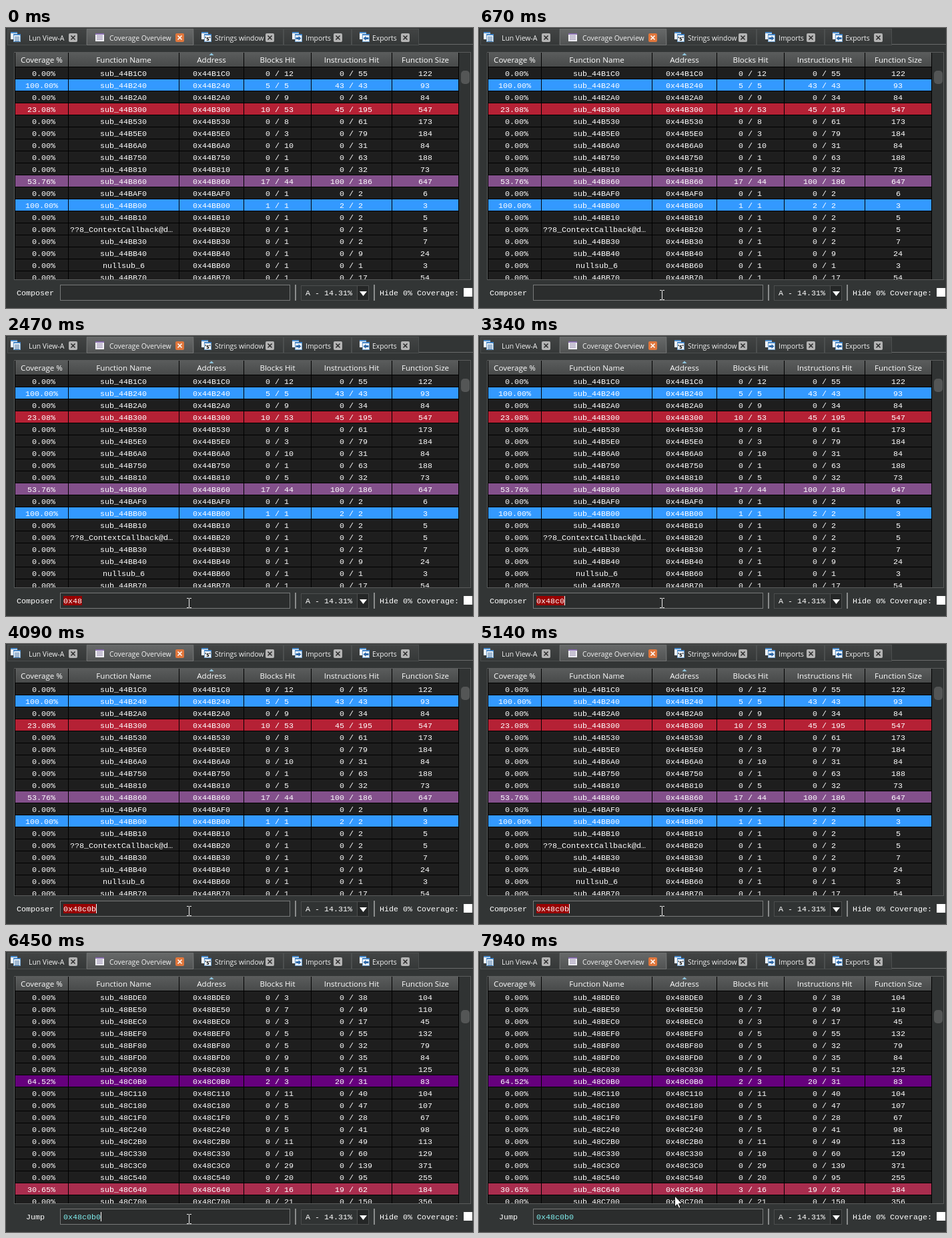
Recreate the animation shown at these times as an HTML page with a canvas. Size 700 px wide and 420 px high, loop 8000 ms.

```html
<!DOCTYPE html>
<html lang="en">
<head>
<meta charset="utf-8">
<title>Coverage Overview</title>
<style>
html, body { margin: 0; width: 100%; height: 100%; overflow: hidden; background: #323535; }
canvas { display: block; }
</style>
</head>
<body>
<canvas id="stage" width="700" height="420"></canvas>
<script>
const c = document.getElementById('stage').getContext('2d');
const LOOP = 8000, CHAR = 7;
const MONO = '11.67px "Liberation Mono", monospace';
const sans = size => `${size}px "Open Sans", sans-serif`;

// address blocks instructions size [coverage]
const parse = text => text.trim().split('\n').map(line => line.trim().split(' '));
const before = parse(`
  44B1C0 12 55 122
  44B240 5/5 43/43 93 100.00
  44B2A0 9 34 84
  44B300 10/53 45/195 547 23.08
  44B530 8 61 173
  44B5E0 3 79 184
  44B6A0 10 31 84
  44B750 1 63 188
  44B810 5 32 73
  44B860 17/44 100/186 647 53.76
  44BAF0 1 2 6
  44BB00 1/1 2/2 3 100.00
  44BB10 1 2 5
  44BB20 1 2 5
  44BB30 1 2 7
  44BB40 1 9 24
  44BB60 1 1 3
  44BB70 1 17 54`);
const after = parse(`
  48BDE0 3 38 104
  48BE50 7 49 110
  48BEC0 3 17 45
  48BEF0 5 55 132
  48BF80 5 32 79
  48BFD0 9 35 84
  48C030 5 51 125
  48C0B0 2/3 20/31 83 64.52
  48C110 11 40 104
  48C180 5 47 107
  48C1F0 5 28 67
  48C240 5 41 98
  48C2B0 11 49 113
  48C330 10 60 129
  48C3C0 29 139 371
  48C540 20 95 255
  48C640 3/16 19/62 184 30.65
  48C700 21 150 356`);
const names = { '44BB20': '??8_ContextCallback@d… ', '44BB60': 'nullsub_6' };
const rowColors = { '100.00': '#3399ff', '23.08': '#b52135', '53.76': '#83508b',
                    '64.52': '#66007d', '30.65': '#a92d4e' };
const columns = [['Coverage %', 14, 93], ['Function Name', 94, 259], ['Address', 260, 356],
                 ['Blocks Hit', 357, 457], ['Instructions Hit', 458, 578], ['Function Size', 579, 678]];

const entry = '0x48c0b0';
const keyTimes = [1290, 1480, 1980, 2220, 3150, 3340, 4090, 5200];
const caretFlips = [1040, 1420, 1480, 1920, 1980, 2470, 3030, 3530, 4090,
                    4590, 5140, 5640, 6200, 6700, 7250, 7750];
const JUMP = 5200, SCROLL = 6450;
// time, kind, x, y
const pointerSteps = [[540, 'beam', 275, 413], [600, 'beam', 275, 405], [670, 'beam', 275, 400],
                      [7880, 'beam', 279, 395], [7940, 'arrow', 293, 366]];

const passed = (times, t) => times.filter(at => t >= at).length;

function rect(x, y, w, h, color) {
  c.fillStyle = color;
  c.fillRect(x, y, w, h);
}
function frame(x, y, w, h, color) {
  c.strokeStyle = color;
  c.lineWidth = 1;
  c.strokeRect(x + .5, y + .5, w - 1, h - 1);
}
function shape(points, fill, stroke) {
  c.beginPath();
  points.forEach(([x, y]) => c.lineTo(x, y));
  c.closePath();
  c.fillStyle = fill;
  c.fill();
  if (stroke) { c.strokeStyle = stroke; c.lineWidth = 1; c.stroke(); }
}
function text(str, x, y, color = '#fff', font = MONO, align = 'left') {
  c.font = font;
  c.textAlign = align;
  c.fillStyle = color;
  c.fillText(str, x, y);
}
function shade(y0, y1, from, to) {
  const g = c.createLinearGradient(0, y0, 0, y1);
  g.addColorStop(0, from);
  g.addColorStop(1, to);
  return g;
}

function closeButton(x, color, cross) {
  c.fillStyle = color;
  c.beginPath();
  c.roundRect(x - 6, 8, 13, 13, 2);
  c.fill();
  c.strokeStyle = cross;
  c.lineWidth = 1.6;
  c.beginPath();
  c.moveTo(x - 2.5, 11.5); c.lineTo(x + 3.5, 17.5);
  c.moveTo(x + 3.5, 11.5); c.lineTo(x - 2.5, 17.5);
  c.stroke();
}

function icon(kind, x) {
  if (kind === 'list') {
    rect(x, 8, 13, 12, '#f4f4f8');
    rect(x, 8, 13, 2, '#8a6fb0');
    for (let y = 11; y < 19; y += 2) rect(x + 2, y, 9, 1, '#9a8fae');
    return;
  }
  rect(x, 6, 10, 11, '#eef4fb');
  rect(x, 6, 10, 2, '#4d8fd0');
  rect(x + 4, 9, 11, 12, '#f6f9fc');
  frame(x + 4, 9, 11, 12, '#6c9cc8');
  rect(x + 4, 9, 11, 2, '#3f83c8');
  if (kind === 'quote') text("'s'", x + 9.5, 18.5, '#111', 'bold ' + sans(9), 'center');
  else if (kind === 'page') for (let y = 13; y < 20; y += 2) rect(x + 6, y, 7, 1, '#4b78a8');
  else {
    const d = kind === 'in' ? 1 : -1, m = x + 9.5;
    shape([[m - 4 * d, 14], [m, 14], [m, 12], [m + 4 * d, 15.5], [m, 19], [m, 17], [m - 4 * d, 17]], '#2e68a8');
  }
}

function drawTabs() {
  rect(619, 24, 81, 1, '#696b6b');
  // left, right, icon, icon x, label, label x, close x
  [[2, 121, 'page', 7, 'Lun View-A', 34, 100], [281, 416, 'quote', 293, 'Strings window', 313, 395],
   [416, 518, 'in', 429, 'Imports', 449, 497], [518, 619, 'out', 530, 'Exports', 549, 598],
   [121, 281, 'list', 134, 'Coverage Overview', 155, 260]].forEach(([l, r, kind, ix, label, lx, cx]) => {
    const active = kind === 'list';
    rect(l, 1, r - l, 25, active ? shade(1, 26, '#686a6a', '#505252') : shade(1, 26, '#424444', '#353838'));
    frame(l, 1, r - l, 25, active ? '#6e7070' : '#4c4f4f');
    icon(kind, ix);
    text(label, lx, 18.5, '#f2f2f2', sans(10.4));
    closeButton(cx, active ? '#e0763c' : '#b4b4b4', active ? '#fff' : '#2c2c2c');
  });
}

function cells([address, blocks, instructions, size, cover = '0.00']) {
  const ratio = (value, pad) => {
    const [hit, total] = value.includes('/') ? value.split('/') : ['0', value];
    return `${hit.padStart(pad)} / ${total.padEnd(pad)}`;
  };
  return [cover.padStart(5) + '%', names[address] || 'sub_' + address, '0x' + address,
          ratio(blocks, 2), ratio(instructions, 3), size];
}

function drawTable(rows, thumbY) {
  rect(12, 36, 685, 342, '#5a5c5c');
  rect(13, 37, 683, 340, '#303333');
  c.save();
  c.beginPath();
  c.rect(13, 37, 666, 340);
  c.clip();
  rect(13, 37, 666, 340, '#000');
  columns.forEach(([title, l, r]) => {
    rect(l, 37, r - l, 21, shade(37, 58, '#5a5c5c', '#484a4a'));
    text(title, (l + r) / 2, 52, '#fff', sans(11.6), 'center');
  });
  shape([[304.5, 41], [308, 37.5], [311.5, 41]], '#8fc7e0');
  rows.forEach((row, i) => {
    const top = 59 + 18 * i;
    const values = cells(row);
    columns.forEach(([, l, r], k) => {
      rect(l, top, r - l, 17, rowColors[row[4]] || '#1e1e1e');
      text(values[k], Math.floor((l + r) / 2 - values[k].length * CHAR / 2), top + 13);
    });
  });
  c.restore();
  c.fillStyle = '#545656';
  c.beginPath();
  c.roundRect(682, thumbY, 13, 20, 5);
  c.fill();
}

function drawBar(t) {
  const typed = passed(keyTimes, t), jump = t >= JUMP;
  text(jump ? 'Jump' : 'Composer', jump ? 30 : 16, 401);
  rect(81, 385, 345, 24, '#2b2d2d');
  frame(81, 385, 345, 24, '#777979');
  if (!jump) rect(86, 390, typed * CHAR, 14, '#990000');
  text(entry.slice(0, typed), 86, 401, jump ? '#80f0f0' : '#fff');
  if (passed(caretFlips, t) % 2) rect(86 + typed * CHAR, 390, 1, 14, '#fff');

  for (const x of [433, 551]) rect(x, 385, 2, 24, '#8a8c8c');
  rect(442, 386, 102, 23, '#303333');
  rect(526, 386, 18, 23, '#242626');
  frame(442, 386, 102, 23, '#4c4e4e');
  rect(526, 387, 1, 21, '#4c4e4e');
  text('A - 14.31%', 449, 401);
  shape([[530, 395], [541, 395], [535.5, 402]], '#fff');
  text('Hide 0% Coverage:', 560, 401);
  rect(686, 390, 13, 13, '#fff');
}

function drawPointer(t) {
  const step = pointerSteps[passed(pointerSteps.map(s => s[0]), t) - 1];
  if (!step) return;
  const [, kind, x, y] = step;
  if (kind === 'beam') {
    rect(x - 1, y - 6, 1, 13, '#eee');
    for (const dy of [-7, 7]) {
      rect(x - 4, y + dy, 3, 1, '#eee');
      rect(x, y + dy, 3, 1, '#eee');
    }
  } else {
    shape([[0, 0], [0, 16], [3.6, 12.6], [6.2, 18.4], [8.6, 17.4], [6, 11.6], [11, 11.6]]
      .map(([dx, dy]) => [x + dx + .5, y + dy]), '#fff', '#111');
  }
}

function draw() {
  const t = performance.now() % LOOP;
  const scrolled = t >= SCROLL;
  rect(0, 0, 700, 420, '#323535');
  drawTabs();
  drawTable(scrolled ? after : before, scrolled ? 87 : 64);
  drawBar(t);
  drawPointer(t);
  requestAnimationFrame(draw);
}
draw();
</script>
</body>
</html>
```
